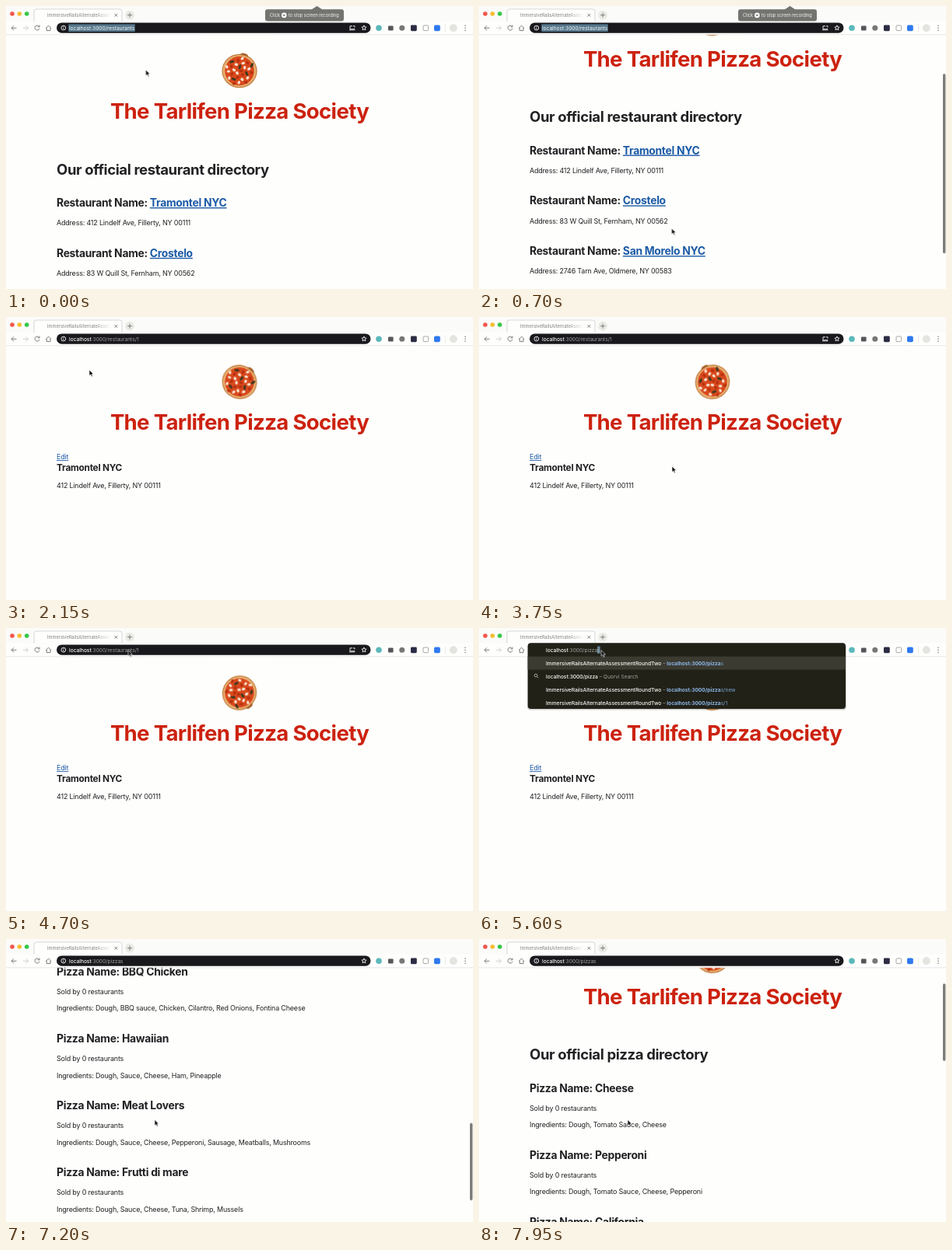
Recreate the animation shown at these times as an HTML page. Size 600x364 px, loop 8000 ms.

```html
<!DOCTYPE html>
<html lang="en">
<head>
<meta charset="utf-8">
<title>Pizza directory demo</title>
<style>
html, body { margin: 0; width: 100%; height: 100%; overflow: hidden; background: #fefefc; }
svg { display: block; width: 100vw; height: 100vh; font-family: Inter, "Open Sans", sans-serif; }
text { fill: #212124; white-space: pre; }
.page text { letter-spacing: -.02em; }
.page .title { font-size: 27.6px; font-weight: 700; fill: #cc220f; text-anchor: middle; letter-spacing: -.025em; }
.heading { font-size: 18.5px; font-weight: 700; }
.name { font-size: 13.85px; font-weight: 700; }
.name.small { font-size: 11.8px; }
.body { font-size: 8.95px; }
.link { fill: #1b5aa6; text-decoration: underline; }
.ui { font-size: 6.6px; fill: #a3a3a0; }
.ui .host { fill: #fdfdfa; font-weight: 500; }
.ui .plain { fill: #fdfdfa; }
.ui .match { fill: #8db6e6; font-weight: 700; }
.ui .rest { fill: #7ba3d2; }
.line { fill: none; stroke: #7c7c7c; stroke-width: 1; }

/* One shared 8 s clock */
.home, .detail, .pizzas, .recorder, .status, .menu, .install, .typed { animation: 8s step-end infinite; }
.home { animation-name: home; }
.detail { animation-name: detail; }
.pizzas { animation-name: pizzas; }
.recorder { animation-name: recorder; }
.status { animation-name: status; }
.menu { animation-name: menu; }
.install { animation-name: install; }
.typed { animation-name: typed; }
.home-scroll { animation: home-scroll 8s linear infinite; }
.home-thumb { animation: home-thumb 8s linear infinite; }
.pizza-scroll { animation: pizza-scroll 8s linear infinite; }
.pizza-thumb { animation: pizza-thumb 8s linear infinite; }
.cursor { animation: cursor 8s ease-in-out infinite; }
.logo { transform-origin: 300px 83.5px; animation: spin 2s linear infinite; }

@keyframes spin { to { transform: rotate(360deg) } }
@keyframes home { 0% { opacity: 1 } 23.125%, to { opacity: 0 } }
@keyframes detail { 0% { opacity: 0 } 23.125% { opacity: 1 } 73.125%, to { opacity: 0 } }
@keyframes pizzas { 0% { opacity: 0 } 73.125%, to { opacity: 1 } }
@keyframes recorder { 0% { opacity: 1 } 16.25%, to { opacity: 0 } }
@keyframes status { 0% { opacity: 0 } 19.375% { opacity: 1 } 23.125%, to { opacity: 0 } }
@keyframes menu { 0% { opacity: 0 } 64.375% { opacity: 1 } 73.125%, to { opacity: 0 } }
@keyframes install { 0% { opacity: 1 } 23.125% { opacity: 0 } 33.75% { opacity: 1 } 73.125%, to { opacity: 0 } }
@keyframes typed {
  0% { transform: translateX(139px) scaleX(16.6) }
  65.625% { transform: translateX(140.5px) scaleX(15.1) }
  66.875% { transform: translateX(144px) scaleX(11.6) }
  68.125% { transform: translateX(147.7px) scaleX(7.9) }
  69.375%, to { transform: translateX(151.5px) scaleX(4.1) }
}
@keyframes home-scroll {
  0%, 3.125% { transform: translateY(0) }
  8.75% { transform: translateY(-67.2px) }
  11.875%, 14.375% { transform: translateY(-132px) }
  18.125%, to { transform: translateY(0) }
}
@keyframes home-thumb {
  0%, 3.125% { transform: translateY(0); opacity: 0 }
  3.2% { transform: translateY(0); opacity: 1 }
  8.75% { transform: translateY(48px) }
  11.875%, 14.375% { transform: translateY(94px) }
  18.125% { transform: translateY(0); opacity: 1 }
  22%, to { transform: translateY(0); opacity: 0 }
}
@keyframes pizza-scroll {
  0%, 78.75% { transform: translateY(0) }
  85% { transform: translateY(-370px) }
  90% { transform: translateY(-641px) }
  91.875%, 93.125% { transform: translateY(-733px) }
  96.25% { transform: translateY(-350px) }
  99.375% { transform: translateY(-62px) }
  to { transform: translateY(-30px) }
}
@keyframes pizza-thumb {
  0%, 78.75% { transform: translateY(0); opacity: 0 }
  78.8% { transform: translateY(0); opacity: 1 }
  85% { transform: translateY(114px) }
  90% { transform: translateY(198px) }
  91.875%, 93.125% { transform: translateY(226px) }
  96.25% { transform: translateY(108px) }
  99.375% { transform: translateY(19px) }
  to { transform: translateY(9px); opacity: 1 }
}
@keyframes cursor {
  0% { transform: translate(179.5px, 82px) }
  6.5%, 15.5% { transform: translate(247.5px, 286px) }
  20%, 23.2% { transform: translate(226px, 253px) }
  26.875% { transform: translate(107px, 68px) }
  31% { transform: translate(112px, 40px) }
  37% { transform: translate(168px, 29px) }
  41.5% { transform: translate(180px, 58px) }
  46.25%, 48.5% { transform: translate(248px, 192px) }
  53.5% { transform: translate(205px, 105px) }
  58%, 73.5% { transform: translate(157px, 28.5px) }
  78.5%, to { transform: translate(191px, 232.5px) }
}
</style>
</head>
<body>
<svg viewBox="0 0 600 364">
  <defs>
    <linearGradient id="fade"><stop offset="0" stop-color="#fefefc" stop-opacity="0"/><stop offset="1" stop-color="#fefefc"/></linearGradient>
  </defs>
  <rect width="600" height="364" fill="#fefefc"/>

  <g class="page home">
    <g class="home-scroll" id="restaurant-list">
      <text class="heading" x="65" y="216.7">Our official restaurant directory</text>
    </g>
    <rect class="home-thumb" x="596" y="39" width="3.4" height="231" rx="1.7" fill="#7c7c78"/>
  </g>
  <g class="page detail" id="detail">
    <text class="body link" x="65" y="183.2">Edit</text>
    <text class="name small" x="65" y="198.2">Tramontel NYC</text>
    <text class="body" x="65" y="219.6">412 Lindelf Ave, Fillerty, NY 00111</text>
  </g>
  <g class="page pizzas">
    <g class="pizza-scroll" id="pizza-list">
      <text class="heading" x="65" y="216.7">Our official pizza directory</text>
    </g>
    <rect class="pizza-thumb" x="596" y="38.5" width="3.4" height="99.5" rx="1.7" fill="#7c7c78"/>
  </g>
  <g class="status">
    <rect x="-2" y="353.5" width="98" height="13" rx="2" fill="#eeeeee" stroke="#cccccc" stroke-width=".5"/>
    <text x="4" y="361.3" font-size="6" style="fill:#666">localhost:3000/restaurants/1</text>
  </g>

  <!-- Browser frame -->
  <rect width="600" height="36.8" fill="#fefefc"/>
  <rect width="600" height="19.5" fill="#fbfbfa"/>
  <path d="M0 36.8H600" stroke="#e2e2e8" stroke-width=".8"/>
  <path d="M36 19.8V7q0-3 3-3H146q3 0 3 3V19.8" fill="#fefefc" stroke="#cdcdd0" stroke-width=".8"/>
  <circle cx="8" cy="10" r="2.8" fill="#f2564a"/>
  <circle cx="17.3" cy="10" r="2.8" fill="#f5bd2f"/>
  <circle cx="26.7" cy="10" r="2.8" fill="#35c748"/>
  <text x="53" y="13.8" font-size="5.7" style="fill:#808080">ImmersiveRailsAlternateAsses</text>
  <rect x="115" y="6" width="20" height="11" fill="url(#fade)"/>
  <rect x="134.5" y="6" width="12" height="11" fill="#fefefc"/>
  <path class="line" d="M139.5 10l3.6 3.6m0-3.6l-3.6 3.6" stroke-width=".8"/>
  <circle cx="159" cy="11.7" r="6" fill="#ebebe6"/>
  <path class="line" d="M156 11.7h6m-3-3v6"/>
  <path class="line" d="M13.5 28.3H7m3-3l-3 3 3 3"/>
  <path class="line" d="M22 28.3h6.5m-3-3l3 3-3 3" style="stroke:#d0d0d0"/>
  <path class="line" d="M42.6 26.4a3 3 0 1 0 .4 2.5M43 24.6v2.3h-2.3"/>
  <path class="line" d="M51 28.6l3.6-3.4 3.6 3.4M52.2 28v3.6h4.8V28"/>
  <rect x="65" y="21.4" width="403.5" height="13.4" rx="6.7" fill="#18181d"/>
  <g class="line" style="stroke:#e6e6e6" stroke-width=".8">
    <circle cx="73.8" cy="28.1" r="2.9"/>
    <path d="M73.8 27.7v2M73.8 26.1v.8"/>
    <path d="M460 24.9l.9 2.1 2.2.2-1.7 1.5.5 2.2-1.9-1.2-1.9 1.2.5-2.2-1.7-1.5 2.2-.2z"/>
    <path class="install" d="M445 25.8h-3v4h5.6v-1M446 25.8h2v1.6M441 30.8h7.4"/>
  </g>
  <circle cx="479" cy="28.3" r="3.8" fill="#5bb8ba"/>
  <rect x="491" y="25.4" width="6.6" height="6" rx="1" fill="#55555a"/>
  <circle cx="508.8" cy="28.3" r="3.5" fill="#777"/>
  <rect x="520" y="24.4" width="7.8" height="7.8" rx="1.4" fill="#2c2c44"/>
  <rect x="536" y="25" width="6.6" height="6.6" rx="1" fill="none" stroke="#a8a8a8"/>
  <rect x="550" y="24.4" width="7.8" height="7.8" rx="1.8" fill="#2f79ee"/>
  <path d="M564.5 23v10.5" stroke="#e2e2e2" stroke-width=".7"/>
  <circle cx="574.8" cy="28.3" r="5" fill="#e4e4e0"/>
  <g fill="#777"><circle cx="590" cy="25.3" r=".8"/><circle cx="590" cy="28.3" r=".8"/><circle cx="590" cy="31.3" r=".8"/></g>

  <g class="home">
    <rect x="80.3" y="23.4" width="85.4" height="9.6" fill="#56788e"/>
    <text class="ui" x="81" y="30.5"><tspan class="plain">localhost:3000/restaurants</tspan></text>
  </g>
  <text class="ui detail" x="81" y="30.5"><tspan class="host">localhost</tspan>:3000/restaurants/1</text>
  <text class="ui pizzas" x="81" y="30.5"><tspan class="host">localhost</tspan>:3000/pizzas</text>

  <g class="recorder">
    <path d="M393 4.2L399.5 0l6.5 4.2H431q3 0 3 3V16.5q0 3-3 3H336q-3 0-3-3V7.2q0-3 3-3z" fill="#737370"/>
    <text x="339" y="14" font-size="5.6" style="fill:#f4f4f2">Click</text>
    <circle cx="357.3" cy="11.9" r="3.3" fill="#fefefc"/>
    <path d="M356.1 10.7l2.4 2.4m0-2.4l-2.4 2.4" stroke="#555" stroke-width=".9"/>
    <text x="363" y="14" font-size="5.6" style="fill:#f4f4f2">to stop screen recording</text>
  </g>

  <g class="menu">
    <rect x="62" y="20.5" width="410" height="85" rx="4" fill="#000" opacity=".18"/>
    <rect x="62.7" y="19.3" width="408.3" height="84.7" rx="4" fill="#212118"/>
    <rect x="62.7" y="36.6" width="408.3" height="17" fill="#3b3b32"/>
    <rect class="typed" x="0" y="23.6" width="1" height="9.2" fill="#66869c"/>
    <text class="ui" x="86" y="30.5"><tspan class="host">localhost</tspan>:3000/pizzas</text>
    <g class="line" style="stroke:#a3a3a0"><circle cx="73" cy="61" r="1.9"/><path d="M74.4 62.4l2 2"/></g>
    <text class="ui" x="86" y="64.5"><tspan class="host">localhost:3000/pizza</tspan> – Quorvi Search</text>
    <g id="suggestions"></g>
  </g>

  <path class="cursor" d="M0 0V7.6L1.8 6 3 8.8 4.3 8.2 3.1 5.5H5.4Z" fill="#111114" stroke="#fefefc" stroke-width=".6"/>
</svg>
<script>
const add = (id, markup) => document.getElementById(id).insertAdjacentHTML('beforeend', markup);
const text = (cls, y, content) => `<text class="${cls}" x="65" y="${y}">${content}</text>`;

// Toppings spread along a sunflower spiral
const topping = (_, i) => {
  const r = 3.4 * Math.sqrt(i + .4), a = i * 2.4;
  const x = 300 + r * Math.cos(a), y = 83.5 + r * Math.sin(a);
  const leaf = i % 6 === 2;
  return `<ellipse cx="${x}" cy="${y}" rx="${leaf ? 3.2 : 2.3}" ry="${leaf ? 1.6 : 1.7}" ` +
    `transform="rotate(${i * 53} ${x} ${y})" fill="${leaf ? '#3f3a20' : i % 3 ? '#f6e3cf' : '#b5300f'}"/>`;
};
const banner = `<g class="logo">
  <ellipse cx="300" cy="83.5" rx="22.6" ry="21.8" fill="#c07a3c"/>
  <ellipse cx="306" cy="63.5" rx="5" ry="2.6" transform="rotate(15 306 63.5)" fill="#a8632c"/>
  <ellipse cx="300" cy="83.5" rx="21.4" ry="20.6" fill="#e8b273"/>
  <circle cx="300" cy="83.5" r="18.8" fill="#d9481c"/>
  ${Array.from({ length: 28 }, topping).join('')}
</g>
<text class="title" x="300" y="145">The Tarlifen Pizza Society</text>`;
['restaurant-list', 'detail', 'pizza-list'].forEach(id => add(id, banner));

const restaurants = [
  ['Tramontel NYC', '412 Lindelf Ave, Fillerty, NY 00111'],
  ['Crostelo', '83 W Quill St, Fernham, NY 00562'],
  ['San Morelo NYC', '2746 Tarn Ave, Oldmere, NY 00583'],
  ['Vino Tavella', '517 Pinder St, Halbrook, NY 00629']
];
restaurants.forEach(([name, address], i) => {
  const y = 258 + i * 64.8;
  add('restaurant-list', text('name', y, `Restaurant Name: <tspan class="link">${name}</tspan>`) +
    text('body', y + 24.2, `Address: ${address}`));
});

const pizzas = [
  ['Cheese', 'Tomato Sauce, Cheese'],
  ['Pepperoni', 'Tomato Sauce, Cheese, Pepperoni'],
  ['California', 'Sauce, Cheese, Avocado, Chicken'],
  ['Margherita', 'Tomato Sauce, Mozzarella, Basil'],
  ['Veggie', 'Sauce, Cheese, Peppers, Onions, Mushrooms'],
  ['BBQ Chicken', 'BBQ sauce, Chicken, Cilantro, Red Onions, Fontina Cheese'],
  ['Hawaiian', 'Sauce, Cheese, Ham, Pineapple'],
  ['Meat Lovers', 'Sauce, Cheese, Pepperoni, Sausage, Meatballs, Mushrooms'],
  ['Frutti di mare', 'Sauce, Cheese, Tuna, Shrimp, Mussels'],
  ['White', 'Ricotta, Mozzarella, Garlic']
];
pizzas.forEach(([name, ingredients], i) => {
  const y = 258 + i * 86.1;
  add('pizza-list', text('name', y, `Pizza Name: ${name}`) +
    text('body', y + 24.2, 'Sold by 0 restaurants') +
    text('body', y + 45.6, `Ingredients: Dough, ${ingredients}`));
});

[[47.5, 's'], [81.5, 's/new'], [98.5, 's/1']].forEach(([y, rest]) => add('suggestions',
  `<text class="ui" x="86" y="${y}"><tspan class="host">ImmersiveRailsAlternateAssessmentRoundTwo</tspan> – ` +
  `<tspan class="match">localhost:3000/pizza</tspan><tspan class="rest">${rest}</tspan></text>`));
</script>
</body>
</html>
```
